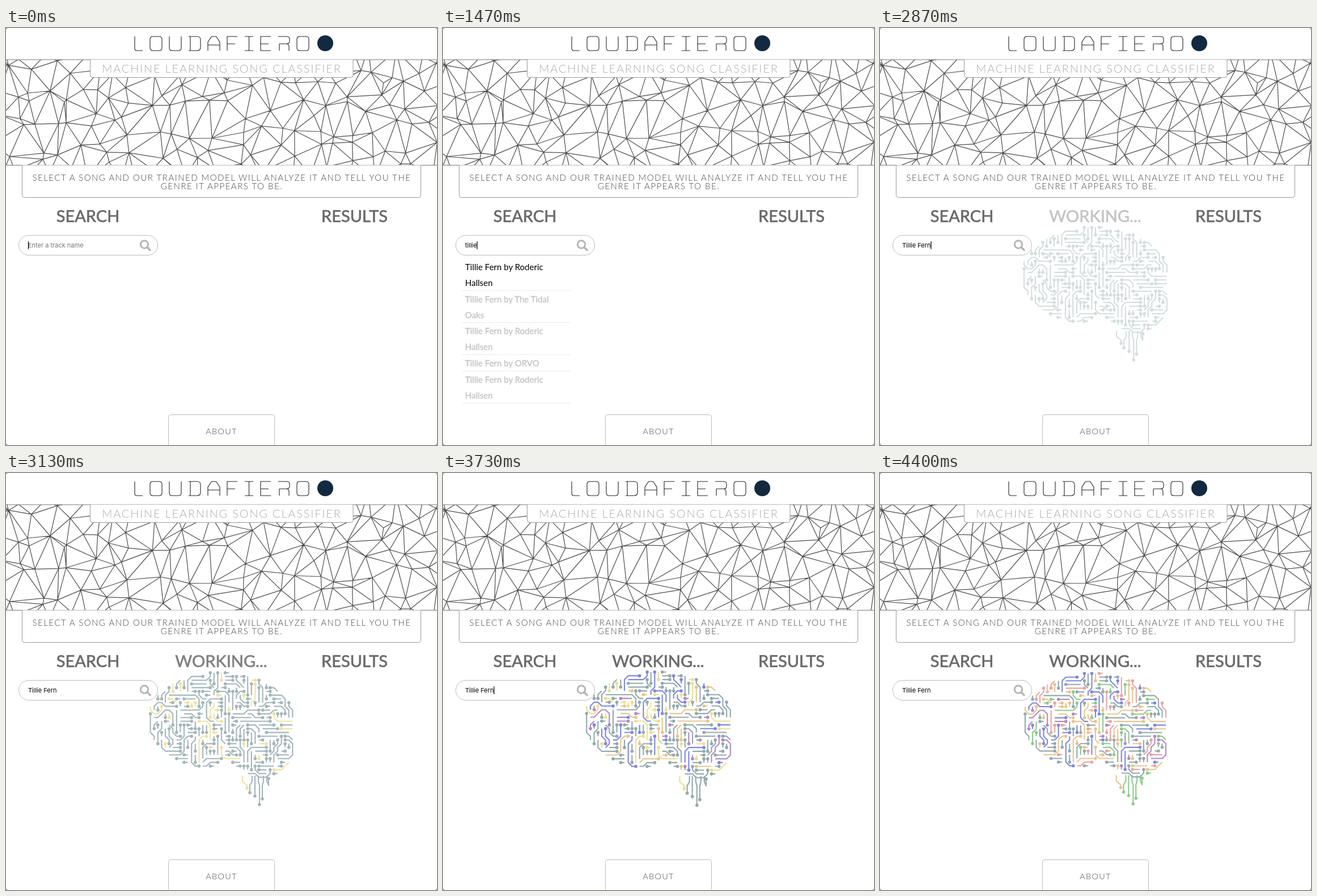
Recreate the animation shown at these times as an HTML page. Size 760 by 737 pixels, loop 4470 ms.

```html
<!DOCTYPE html>
<html lang="en">
<head>
<meta charset="utf-8">
<title>Song classifier</title>
<style>
html, body { margin: 0; width: 100%; height: 100%; overflow: hidden; background: #777; }
svg { display: block; }
text { font-family: Lato, sans-serif; white-space: pre; }
.mid { text-anchor: middle; }
.box { fill: #fff; stroke: #999; }
.light { font-weight: 300; }
.head { font-size: 29px; fill: #6a6a6a; stroke: #6a6a6a; stroke-width: .7; }
.field { font: 11px Inter, sans-serif; }
.item { font-size: 15px; fill: #c4c4c4; stroke: #c4c4c4; stroke-width: .4; }
.item.active { fill: #000; stroke: none; }
.trace { fill: none; stroke-width: 2.1; stroke-linejoin: round; }
.dots { fill: none; stroke-width: 5.6; stroke-linecap: round; }
</style>
</head>
<body>
<svg width="760" height="737" viewBox="0 0 760 737">
  <defs><clipPath id="band"><rect y="56" width="760" height="187"/></clipPath></defs>
  <rect width="760" height="737" rx="4" fill="#fff"/>
  <path id="mesh" clip-path="url(#band)" fill="none" stroke="#4c4c4c" stroke-width="1.2"/>
  <path d="M0 56H760M0 242.5H760" stroke="#777"/>
  <g id="logo" role="img" fill="none" stroke="#222" stroke-width="1.1"></g>
  <circle cx="563" cy="27" r="14" fill="#12293f"/>
  <path class="box" d="M148.5 56V83.5q0 4 4 4H608q4 0 4-4V56"/>
  <text class="mid light" x="380.5" y="79" font-size="20" letter-spacing="1.8" fill="#aaa">MACHINE LEARNING SONG CLASSIFIER</text>
  <path class="box" d="M28.5 242.5V295.5q0 4 4 4H727.500q4 0 4-4V242.5"/>
  <g class="mid light" font-size="15" letter-spacing="1.5" fill="#444">
    <text x="380.5" y="269.5">SELECT A SONG AND OUR TRAINED MODEL WILL ANALYZE IT AND TELL YOU THE</text>
    <text x="380.5" y="284.5">GENRE IT APPEARS TO BE.</text>
  </g>
  <text class="head mid" x="144.5" y="342.5">SEARCH</text>
  <text class="head mid" x="614.5" y="342.5">RESULTS</text>
  <rect x="22.5" y="366.5" width="245" height="35" rx="17.5" fill="#fff" stroke="#bbb"/>
  <g fill="none" stroke="#b5b5b5" stroke-width="3">
    <circle cx="244" cy="382.5" r="6.7"/><path d="M249 387.5L254 392.5" stroke-width="3.6" stroke-linecap="round"/>
  </g>
  <text id="query" class="field" x="39" y="388"></text>
  <path id="caret" d="M0 377V391" stroke="#000" stroke-width="1.2"/>
  <g id="lists"></g>
  <g id="working">
    <text class="head mid" x="379.5" y="342.5">WORKING...</text>
    <g id="brain"></g>
  </g>
  <path class="box" style="stroke:#bbb" d="M286.5 738V687.5q0-4 4-4H469.5q4 0 4 4V738"/>
  <text class="mid light" x="380" y="717.5" font-size="14.4" letter-spacing="1.4" fill="#444">ABOUT</text>
</svg>
<script>
const LOOP = 4470, CHOSEN = 2530;
const $ = id => document.getElementById(id);

function add(parent, tag, attrs, text = "") {
  const node = document.createElementNS("http://www.w3.org/2000/svg", tag);
  for (const key in attrs) node.setAttribute(key, attrs[key]);
  node.textContent = text;
  return parent.appendChild(node);
}

function seeded(seed) {
  return () => (seed = (seed * 16807) % 2147483647) / 2147483647;
}

// Logo lettering: glyph width and strokes
const GLYPHS = {
  L: [14, "M0 0V21q0 4 4 4H14"],
  O: [21, "M5 0H16q5 0 5 5V20q0 5-5 5H5q-5 0-5-5V5q0-5 5-5"],
  U: [21, "M0 0V20q0 5 5 5H16q5 0 5-5V0"],
  D: [21, "M0 0H15q6 0 6 6V19q0 6-6 6H0M3 0V25"],
  A: [21, "M0 25V10L5 2q1-2 3-2H13q2 0 3 2L21 10V25M0 15H21"],
  F: [18, "M18 0H0V25M0 13H14"],
  I: [15, "M0 0H15M7.5 0V25M0 25H15"],
  E: [18, "M18 0H0V25H18M0 13H14"],
  R: [20, "M0 0H15q5 0 5 5V8q0 5-5 5H2M14 13q5 0 5 5V25M2 13V25"]
};

function drawLogo(word) {
  let x = 227;
  for (const letter of word) {
    const [width, d] = GLYPHS[letter];
    add($("logo"), "path", { d, transform: `translate(${x} 15)` });
    x += width + 13;
  }
  $("logo").setAttribute("aria-label", word);
}

// Triangulated banner: Delaunay edges over a scattered grid
function triangleEdges(points) {
  const count = points.length;
  const all = [...points, [-9000, -9000], [9000, -9000], [400, 9000]];
  const circle = (i, j, k) => {
    const [ax, ay] = all[i];
    const bx = all[j][0] - ax, by = all[j][1] - ay, cx = all[k][0] - ax, cy = all[k][1] - ay;
    const d = 2 * (bx * cy - by * cx), b = bx * bx + by * by, c = cx * cx + cy * cy;
    const ux = (cy * b - by * c) / d, uy = (bx * c - cx * b) / d;
    return { ids: [i, j, k], x: ax + ux, y: ay + uy, r: Math.hypot(ux, uy) };
  };
  const sides = ([i, j, k]) => [[i, j], [j, k], [k, i]].map(e => e.sort((a, b) => a - b));
  let triangles = [circle(count, count + 1, count + 2)];
  points.forEach(([x, y], p) => {
    const rim = new Map();
    triangles = triangles.filter(t => {
      if (Math.hypot(x - t.x, y - t.y) >= t.r) return true;
      for (const e of sides(t.ids)) {
        const key = e.join();
        rim.has(key) ? rim.delete(key) : rim.set(key, e);
      }
      return false;
    });
    for (const [i, j] of rim.values()) triangles.push(circle(i, j, p));
  });
  const edges = new Map();
  for (const t of triangles)
    for (const e of sides(t.ids)) if (e[1] < count) edges.set(e.join(), e);
  return [...edges.values()];
}

function drawMesh() {
  const random = seeded(41), points = [], cell = 35;
  for (let x = -2 * cell; x < 760 + cell; x += cell)
    for (let y = 56 - 2 * cell; y < 243 + cell; y += cell)
      points.push([x + random() * cell, y + random() * cell]);
  $("mesh").setAttribute("d", triangleEdges(points).map(([i, j]) => `M${points[i]}L${points[j]}`).join(""));
}

// Circuit brain: traces start teal, then one hue after another lights up
const TEAL = "#93a9ad", HUES = ["#ecdf92", "#b18bc4", "#7f87de", "#e8c58f", "#8ccb8e", "#e8a5a0"];
const YELLOW = 0, ORANGE = 3, GREEN = 4, GROUP_COUNT = 9;
const litAt = group => 2950 + group * 200;

function traceColor(group, t) {
  if (group >= HUES.length || t < litAt(group)) return TEAL;
  return HUES[group === YELLOW && t >= litAt(5) ? ORANGE : group];
}

const inEllipse = (x, y, cx, cy, rx, ry) => Math.hypot((x - cx) / rx, (y - cy) / ry) < 1;
const inBrain = (x, y) => !inEllipse(x, y, 385, 528, 18, 18) &&
  (inEllipse(x, y, 379, 438, 131, 86) || inEllipse(x, y, 452, 485, 57, 54));

const DIRS = Array.from({ length: 8 }, (_, i) =>
  [Math.cos, Math.sin].map(f => Math.round(f(i * Math.PI / 4))));

function growTraces(random) {
  const pitch = 6.6, used = new Set(), cells = [], traces = [];
  const place = ([c, r]) => [248 + c * pitch, 353 + r * pitch];
  const free = cell => !used.has(cell.join()) && inBrain(...place(cell));
  for (let c = 0; c < 41; c++) for (let r = 0; r < 30; r++) cells.push([random(), [c, r]]);
  cells.sort((a, b) => a[0] - b[0]);
  for (const [, start] of cells) {
    if (!free(start)) continue;
    const walk = [start], length = 4 + random() * 7;
    let dir = 2 * Math.floor(random() * 4);
    used.add(start.join());
    while (walk.length < length) {
      const [c, r] = walk[walk.length - 1];
      const side = random() < .5 ? 1 : 7;
      const turns = walk.length === 1 ? [0, 2, 4, 6, 1, 3, 5, 7]
        : dir % 2 || random() < .2 ? [side, 0, 8 - side] : [0, side, 8 - side];
      const open = turns.map(turn => (dir + turn) % 8).find(d => {
        const [dx, dy] = DIRS[d];
        const crossed = dx && dy && used.has([c + dx, r].join()) && used.has([c, r + dy].join());
        return !crossed && free([c + dx, r + dy]);
      });
      if (open === undefined) break;
      dir = open;
      walk.push([c + DIRS[dir][0], r + DIRS[dir][1]]);
      used.add(walk[walk.length - 1].join());
    }
    if (walk.length > 1) traces.push(walk.map(place));
  }
  return traces;
}

function drawBrain() {
  const random = seeded(907);
  const shapes = Array.from({ length: GROUP_COUNT }, () => ({ lines: "", dots: "" }));
  const put = (group, points) => {
    const [x, y] = points[0];
    shapes[group].lines += "M" + points.map(p => p.map(v => +v.toFixed(1))).join("L");
    shapes[group].dots += `M${x.toFixed(1)} ${y.toFixed(1)}h.01`;
  };
  for (const trace of growTraces(random)) put(Math.floor(random() * GROUP_COUNT), trace);
  // Stem: each wire drops from the brain, bends and ends in a dot
  const wire = (group, x, y, bend) =>
    put(group, [[x, y], [x, 552], [x + bend, 545], [x + bend, 535]]);
  wire(YELLOW, 425, 557, -8);
  wire(GREEN, 430, 565, 4);
  wire(GREEN, 439, 571, 0);
  wire(GREEN, 447, 586, -2);
  wire(GREEN, 452, 576, 2);
  wire(GREEN, 463, 540, -3);
  return shapes.map(({ lines, dots }) => {
    const g = add($("brain"), "g", {});
    add(g, "path", { class: "trace", d: lines });
    add(g, "path", { class: "dots", d: dots });
    return g;
  });
}

// Suggestions: one string per item, "|" breaks the line
const FIRST = [
  "Get Yo Ti**r (feat.|BrewinKOZ) - Remix by|Gallant Pim",
  "Ti**r Always by Old Crumb",
  "Lo busca Ti (feat. Garrelo,|Izeva, Luenka & Corwin|Vales) by Tommo Tolli",
  "Ti Somewhere by Maps To|The Orchards",
  "Oak Bark Ti-Fluorides by|QV GLUM"
];
const BY_RODERIC = "Tillie Fern by Roderic|Hallsen";
const SECOND = [BY_RODERIC, "Tillie Fern by The Tidal|Oaks", BY_RODERIC, "Tillie Fern by ORVO", BY_RODERIC];

function drawList(items) {
  const g = add($("lists"), "g", {});
  let y = 407.7;
  items.forEach((item, i) => {
    for (const line of item.split("|")) {
      add(g, "text", { class: i ? "item" : "item active", x: 39, y: y + 20.3 }, line);
      y += 28;
    }
    y += .7;
    add(g, "path", { d: `M34 ${y - .4}H225`, stroke: "#eaeaea" });
  });
  return g;
}

function typedAt(t) {
  if (t >= CHOSEN) return "Tillie Fern";
  return "tillie".slice(0, Math.max(0, Math.floor((t - 400) / 180) + 1));
}

drawLogo("LOUDAFIERO");
drawMesh();
const brainParts = drawBrain();
const firstList = drawList(FIRST), secondList = drawList(SECOND);
const show = (node, on) => node.setAttribute("visibility", on ? "visible" : "hidden");

function render(t) {
  const typed = typedAt(t), query = $("query");
  query.textContent = typed || "Enter a track name";
  query.setAttribute("fill", typed ? "#000" : "#757575");
  const caretX = 39.5 + (typed ? query.getComputedTextLength() : 0);
  $("caret").setAttribute("transform", `translate(${caretX} 0)`);
  show($("caret"), t < CHOSEN || (t - CHOSEN) % 1000 < 500);

  show(firstList, t >= 580 && t < 870);
  show(secondList, t >= 870 && t < CHOSEN);

  const fade = Math.min(1, Math.max(0, (t - CHOSEN) / 800));
  $("working").setAttribute("opacity", fade * fade * (3 - 2 * fade));
  const scale = 1 + .011 * Math.cos((t - 3720) / 470 * 2 * Math.PI);
  $("brain").setAttribute("transform", `translate(379.5 470) scale(${scale}) translate(-379.5 -470)`);
  brainParts.forEach((part, group) => part.setAttribute("stroke", traceColor(group, t)));
}

const began = performance.now();
function tick() {
  render((performance.now() - began) % LOOP);
  requestAnimationFrame(tick);
}
tick();
</script>
</body>
</html>
```
